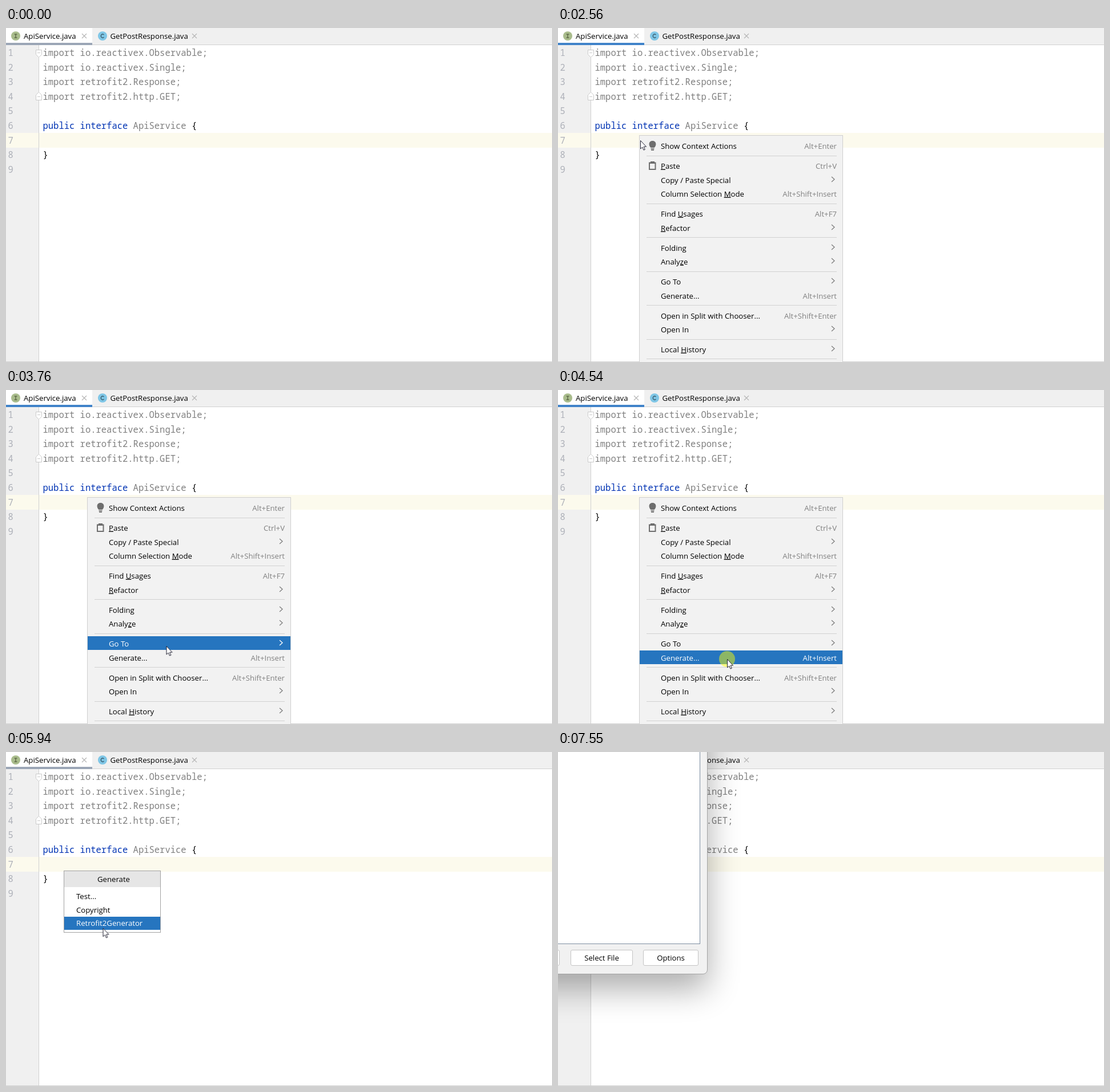
These frames come from a looping animation (956x586 px, 8 s). An HTML page:

```html
<!DOCTYPE html>
<html lang="en">
<head>
<meta charset="utf-8">
<title>Editor: generate menu</title>
<style>
html, body { margin: 0; width: 100%; height: 100%; overflow: hidden; background: #fff; }
svg { position: absolute; left: 0; top: 0; width: 956px; height: 586px; }
text, .dialog { font: 13.2px "Open Sans", "Noto Sans", sans-serif; fill: #000; }
.code text { font: 15.5px "Noto Sans Mono", "DejaVu Sans Mono", monospace; fill: #080808; }
.code .num { fill: #adb0b8; }
.code .dim { fill: #808080; }
.code .kw { fill: #0033b3; }
.key { fill: #808080; text-anchor: end; }
.mid { text-anchor: middle; }
.u { text-decoration: underline; }
.on text { fill: #fff; }
.on rect { fill: #2675bf; }
.line { fill: none; stroke: #d1d1d1; }
.chev { fill: none; stroke: #7f7f7f; stroke-width: 1.3; }
.on .chev { stroke: #fff; }
.x { fill: none; stroke: #b4b4b4; stroke-width: 1.1; }
.panel { fill: #f2f2f2; stroke: #cfcfcf; }

.dialog { position: absolute; left: -300px; top: -300px; width: 560px; height: 688px;
  background: #f1f1f1; border: 1px solid #a4a4a4; border-radius: 8px; box-sizing: content-box;
  box-shadow: 0 26px 56px rgba(0, 0, 0, .32); }
.dialog div { position: absolute; box-sizing: border-box; background: #fff; }
.area { left: 40px; top: 40px; width: 508px; height: 596px; border: 1px solid #7d8da1; }
.btn { top: 646px; height: 28px; border: 1px solid #c4c4c4; border-radius: 3px;
  line-height: 27px; text-align: center; }

/* Parts that come and go: --k names the schedule */
.t { opacity: 0; animation: var(--k) 8s step-end infinite; }
@keyframes focus { 0% { opacity: 0 } 28.875% { opacity: 1 } 61.125% { opacity: 0 } }
@keyframes menu { 0% { opacity: 0 } 29.875% { opacity: 1 } 59.25% { opacity: 0 } }
@keyframes paste { 0% { opacity: 0 } 38.875% { opacity: 1 } 40.625% { opacity: 0 } }
@keyframes refactor { 0% { opacity: 0 } 40.625% { opacity: 1 } 41.5% { opacity: 0 } }
@keyframes folding { 0% { opacity: 0 } 41.5% { opacity: 1 } 42.125% { opacity: 0 } }
@keyframes analyze { 0% { opacity: 0 } 42.125% { opacity: 1 } 46.375% { opacity: 0 } }
@keyframes submenu { 0% { opacity: 0 } 44.625% { opacity: 1 } 46.375% { opacity: 0 } }
@keyframes goto { 0% { opacity: 0 } 46.375% { opacity: 1 } 48.65% { opacity: 0 } }
@keyframes generate { 0% { opacity: 0 } 48.65% { opacity: 1 } 59.25% { opacity: 0 } }
@keyframes popup { 0% { opacity: 0 } 61.125% { opacity: 1 } 82% { opacity: 0 } }
@keyframes test { 0% { opacity: 0 } 61.125% { opacity: 1 } 71.75% { opacity: 0 } }
@keyframes retro { 0% { opacity: 0 } 71.75% { opacity: 1 } 82% { opacity: 0 } }
@keyframes dialog { 0% { opacity: 0 } 84.5% { opacity: 1 } }
@keyframes click {
  0% { opacity: 0 } 28.875% { opacity: 1 } 29.875% { opacity: 0 }
  56.75% { opacity: 1 } 59.25% { opacity: 0 } 79.5% { opacity: 1 } 82% { opacity: 0 }
}
@keyframes arrow {
  0% { opacity: 0 } 29.875% { opacity: 1 } 59.25% { opacity: 0 } 71.75% { opacity: 1 } 82% { opacity: 0 }
}
@keyframes beam {
  0% { opacity: 0 } 6.625% { opacity: 1 } 29.875% { opacity: 0 } 59.25% { opacity: 1 }
  71.75% { opacity: 0 } 82% { opacity: 1 } 94.375% { opacity: 0 }
}

/* Pointer path, sampled about every 66 ms like a screen recording */
.pointer { animation: path 8s step-end infinite; }
@keyframes path {
  0% { transform: translate(849px, 560px) }
  6.625% { transform: translate(849px, 560px); animation-timing-function: steps(5) }
  10.9375% { transform: translate(370px, 320px); animation-timing-function: steps(6) }
  16.125% { transform: translate(167px, 209px); animation-timing-function: steps(7) }
  21.875% { transform: translate(144px, 197px) }
  38.0375% { transform: translate(144px, 197px); animation-timing-function: steps(4) }
  41.5% { transform: translate(248px, 396px); animation-timing-function: steps(4) }
  44.625% { transform: translate(260px, 408px) }
  45.75% { transform: translate(260px, 408px); animation-timing-function: steps(2) }
  47% { transform: translate(280.5px, 449px); animation-timing-function: steps(5) }
  51.125% { transform: translate(296px, 472px) }
  66.75% { transform: translate(250.5px, 414px); animation-timing-function: steps(6) }
  71.75% { transform: translate(180px, 313px); animation-timing-function: steps(5) }
  75.875% { transform: translate(162.5px, 306px) }
  91.9375% { transform: translate(162.5px, 306px); animation-timing-function: steps(3) }
  94.375%, 100% { transform: translate(-78px, 68px) }
}
</style>
</head>
<body>
<svg viewBox="0 0 956 586">
  <rect width="956" height="586" fill="#fff"/>
  <rect y="30" width="57" height="556" fill="#f0f0f0"/>
  <rect y="184" width="956" height="26" fill="#fcfaed"/>
  <path class="line" d="M57.5 30V586"/>

  <rect width="956" height="29" fill="#f0f0f0"/>
  <path class="line" d="M0 29.5H956M0 585.5H956"/>
  <rect width="151" height="27" fill="#fff"/>
  <rect y="26" width="151" height="4" fill="#9ba6b6"/>
  <rect class="t" style="--k:focus" y="26" width="151" height="4" fill="#4083c9"/>
  <circle cx="17" cy="14" r="8" fill="#a9bc8c"/>
  <path d="M14.5 10.8H19.5M17 10.8V17.2M14.5 17.2H19.5" fill="none" stroke="#55603f" stroke-width="1.3"/>
  <circle cx="169" cy="14" r="8" fill="#7fc6e6"/>
  <path d="M171.4 12A2.9 3.2 0 1 0 171.4 16" fill="none" stroke="#3b5f70" stroke-width="1.4"/>
  <text x="31" y="19">ApiService.java</text>
  <text x="182.5" y="19">GetPostResponse.java</text>
  <path class="x" d="M133 10l8 8m0-8l-8 8M326 10l8 8m0-8l-8 8"/>

  <g class="code" id="code"></g>
  <g fill="#fff" stroke="#cacaca">
    <path d="M52.5 38.5H62.5V46.5L57.5 51.5L52.5 46.5ZM55 43.5H60"/>
    <path d="M52.5 126.5H62.5V117.5L57.5 112.5L52.5 117.5ZM55 120.5H60"/>
  </g>

  <g class="t" style="--k:menu">
    <rect class="panel" x="142.5" y="188.5" width="356" height="410"/>
    <path class="line" id="rules"/>
    <g id="menu"></g>
    <g fill="#6e6e6e">
      <path d="M162.5 210C158 206 158.5 198 165.5 198S173 206 168.5 210ZM162.5 211H168.5V212.5H162.5ZM163 213.3H168V215H163Z"/>
      <path d="M159 235.5H162V234H169V235.5H171.5V249H159ZM161 238V247H169.5V238Z" fill-rule="evenodd"/>
    </g>
    <g class="t" style="--k:submenu">
      <rect class="panel" x="498.5" y="390.5" width="365" height="210"/>
      <path class="line" d="M511 549.5H852"/>
      <g id="submenu"></g>
    </g>
  </g>

  <g class="t" style="--k:popup">
    <rect x="101.5" y="208.5" width="169" height="108" fill="#fff" stroke="#a2a2a2"/>
    <rect x="102" y="209" width="168" height="28" fill="#e6e6e6"/>
    <text class="mid" x="188.5" y="228">Generate</text>
    <g id="popup"></g>
  </g>
</svg>

<div class="dialog t" style="--k:dialog">
  <div class="area"></div>
  <div class="btn" style="left:200px;width:102px"></div>
  <div class="btn" style="left:321px;width:109px">Select File</div>
  <div class="btn" style="left:448px;width:97px">Options</div>
</div>

<svg viewBox="0 0 956 586">
  <g class="pointer">
    <circle class="t" style="--k:click" r="14" fill="#ff0" fill-opacity=".47"/>
    <path class="t" style="--k:beam" d="M-3.5 -7H-1L0 -6L1 -7H3.5M0 -6V6M-3.5 7H-1L0 6L1 7H3.5"
      fill="none" stroke="#222" stroke-width="1.3"/>
    <path class="t" style="--k:arrow" d="M.5 .5V15L3.8 12L6 17.2L8.3 16.2L6.1 11.2H10.5Z"
      fill="#fff" stroke="#223"/>
  </g>
</svg>

<script>
const $ = id => document.getElementById(id);
const text = (x, y, s, cls = '') =>
  `<text x="${x}" y="${y}" class="${cls}">${s.replace(/_(.)/, '<tspan class="u">$1</tspan>')}</text>`;

// Code
const lines = [
  [['import io.reactivex.Observable;', 'dim']],
  [['import io.reactivex.Single;', 'dim']],
  [['import retrofit2.Response;', 'dim']],
  [['import retrofit2.http.GET;', 'dim']],
  [],
  [['public interface', 'kw'], [' ApiService', 'dim'], [' {', '']],
  [],
  [['}', '']],
  []
];
$('code').innerHTML = lines.map((parts, i) => {
  const y = 49 + 25.6 * i;
  const spans = parts.map(([s, cls]) => `<tspan class="${cls}">${s}</tspan>`).join('');
  return text(3.5, y, String(i + 1), 'num') + text(64.5, y, spans);
}).join('');

// A row of a list; with a schedule it also gets a selected look on top
const row = (left, width, pad, rise, h) => ([mid, label, key = '', when]) => {
  const right = left + width - 10;
  const base = mid + 4.6;
  const tail = key === '>'
    ? `<path class="chev" d="M${right - 9} ${mid - 6}l5 4.5l-5 4.5"/>`
    : text(right, base, key, 'key');
  const body = text(left + pad, base, label) + tail;
  const bar = `<rect x="${left}" y="${mid - rise}" width="${width}" height="${h}"/>`;
  return body + (when ? `<g class="on t" style="--k:${when}">${bar}${body}</g>` : '');
};

$('menu').innerHTML = [
  [207, 'Show Context Actions', 'Alt+Enter'],
  [242, '_Paste', 'Ctrl+V', 'paste'],
  [267, 'Copy / Paste Special', '>'],
  [291, 'Column Selection _Mode', 'Alt+Shift+Insert'],
  [326, 'Find _Usages', 'Alt+F7'],
  [351, '_Refactor', '>', 'refactor'],
  [386, 'Folding', '>', 'folding'],
  [410, 'Analy_ze', '>', 'analyze'],
  [445, 'Go To', '>', 'goto'],
  [470, 'Generate...', 'Alt+Insert', 'generate'],
  [505, 'Open in Split with Chooser...', 'Alt+Shift+Enter'],
  [529, 'Open In', '>'],
  [564, 'Local _History', '>']
].map(row(143, 355, 37, 13, 24)).join('');

$('rules').setAttribute('d',
  [224, 308, 367, 427, 486, 546, 580].map(y => `M155 ${y + .5}H488`).join(''));

$('submenu').innerHTML = [
  [410, '_Inspect Code...'],
  [434, '_Code Cleanup...'],
  [459, 'Silent Code Cleanup'],
  [483, '_Run Inspection by Name...', 'Ctrl+Alt+Shift+I'],
  [508, 'Configure Current File Analysis...', 'Ctrl+Alt+Shift+H'],
  [532, 'View Offline Inspection Results...'],
  [567, 'Infer Nullity...']
].map(row(499, 364, 37, 13, 24)).join('');

$('popup').innerHTML = [
  [253.5, 'Test...', '', 'test'],
  [277, 'Copyright'],
  [300.5, 'Retrofit2Generator', '', 'retro']
].map(row(102, 168, 21, 11.5, 23)).join('');
</script>
</body>
</html>
```
